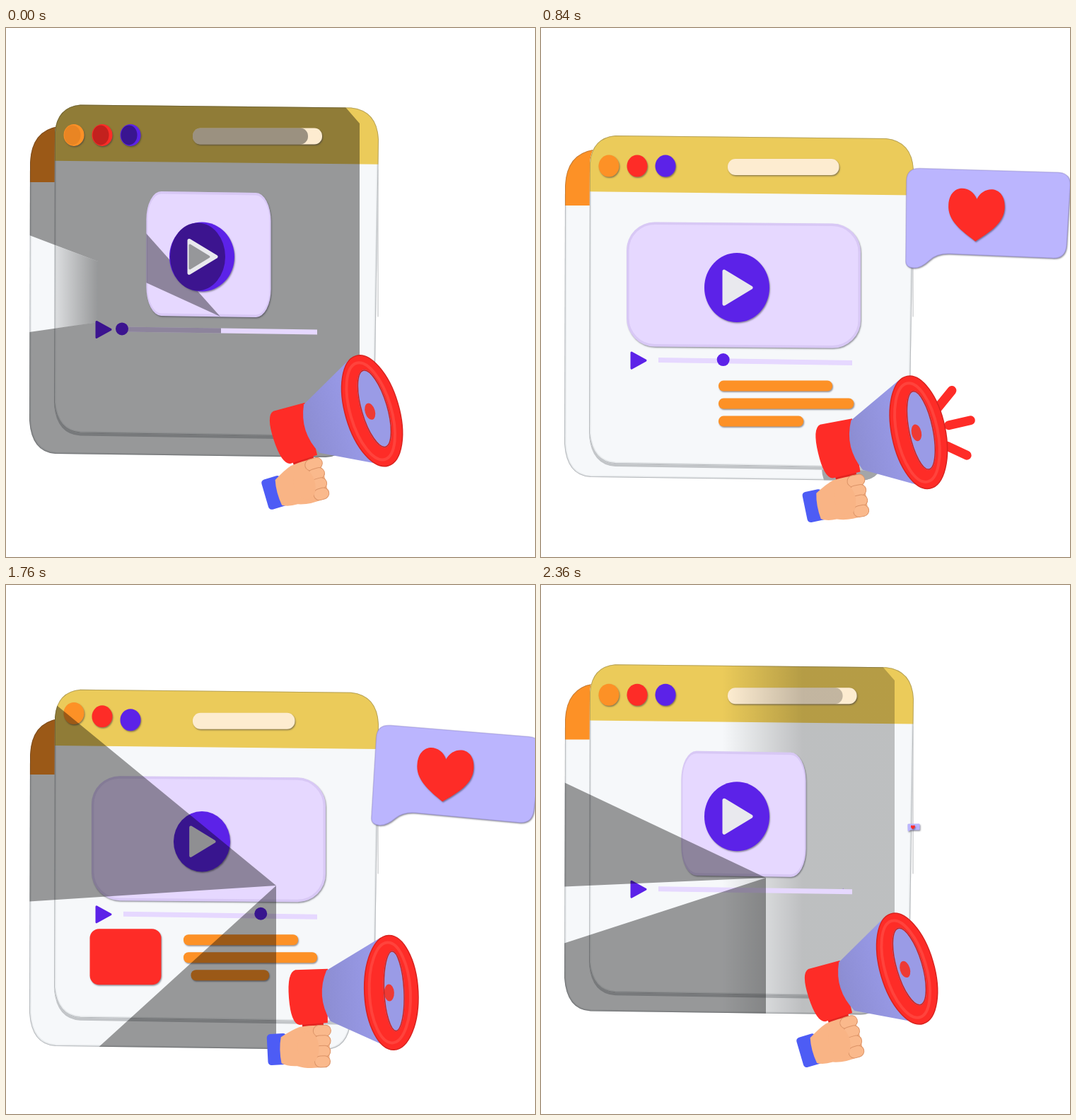
Write an HTML page with a canvas that moves like this. It is 748 px wide and 748 px high and loops after 2.4 s.

```html
<!DOCTYPE html>
<html lang="en">
<head>
<meta charset="utf-8">
<title>Video campaign</title>
<style>
html, body { margin: 0; width: 100%; height: 100%; overflow: hidden; background: #fff; }
canvas { display: block; width: 100vw; height: 100vh; }
</style>
</head>
<body>
<canvas id="stage" width="748" height="748"></canvas>
<script>
const ctx = document.getElementById('stage').getContext('2d');
const LOOP = 2400, STEP = 40, TAU = Math.PI * 2;
const RED = '#fe2c27', ORANGE = '#fd9126', PURPLE = '#5c22e8', DEEP = '#3c148f';
const LILAC = '#e6d8ff', WHITE = '#f6f8fa', SKIN = '#f9b485';
const SHADE = 'rgba(0,0,0,.39)', HAZE = 'rgba(0,0,0,.23)';

const front = new Path2D('M69 148Q72 112 105 109L488 113Q525 117 527 158L521 540Q518 580 480 579L105 573Q72 571 68 530Z');
const back = new Path2D('M34 190Q36 145 74 139L455 142Q488 145 490 185L488 565Q484 606 452 607L70 602Q36 600 33 555Z');
const bubble = new Path2D('M-7-134Q-7-152 12-152L208-153Q226-153 226-135L224-50Q223-30 203-31L58-32Q40-32 30-22Q18-10 8-10Q-4-10-4-20Z');
const heart = new Path2D('M0-22C8-42 39-44 40-13C41 10 20 24 0 38C-20 24-41 10-40-13C-39-44-8-42 0-22Z');

const clamp = x => Math.max(0, Math.min(1, x));
const rad = deg => deg * Math.PI / 180;
const wave = (t, shift = 0, period = 1200) => Math.cos(TAU * (t - shift) / period);
// Smoothstep from 0 at time a to 1 at time b
const ramp = (t, a, b) => {
  const x = clamp((t - a) / (b - a));
  return x * x * (3 - 2 * x);
};
// Elastic arrival from 0 to 1
const spring = age => age < 0 ? 0 : 1 - Math.exp(-age / 94) * wave(age, 0, 240);
// One swing to +1 and back through -1, resting before and after
const swing = age => {
  const u = clamp(age / 500);
  return Math.sin(TAU * u) * Math.sin(Math.PI * u);
};
const swings = (t, delay) => swing(t - 140 - delay) + swing(t - 1600 - delay);

function group(x, y, draw, angle = 0, sx = 1, sy = sx) {
  ctx.save();
  ctx.translate(x, y);
  ctx.rotate(rad(angle));
  ctx.scale(sx, sy);
  draw();
  ctx.restore();
}
function fill(path, color) { ctx.fillStyle = color; ctx.fill(path); }
function outline(path, color, width) {
  ctx.strokeStyle = color;
  ctx.lineWidth = width;
  ctx.stroke(path);
}
function raised(path, color) {
  ctx.save();
  ctx.shadowColor = 'rgba(50,50,65,.5)';
  ctx.shadowBlur = 2;
  ctx.shadowOffsetX = 1;
  ctx.shadowOffsetY = 1.5;
  fill(path, color);
  ctx.restore();
}
function oval(x, y, rx, ry) {
  const p = new Path2D();
  p.ellipse(x, y, rx, ry, 0, 0, TAU);
  return p;
}
function box(x, y, w, h, r) {
  const p = new Path2D();
  p.roundRect(x, y, w, h, r);
  return p;
}
function poly(...pts) {
  const p = new Path2D();
  for (let i = 0; i < pts.length; i += 2) p.lineTo(pts[i], pts[i + 1]);
  p.closePath();
  return p;
}
// Wedge of shadow that spreads from one point between two angles
function fan(x, y, from, to) {
  const far = a => [x + 900 * Math.cos(rad(a)), y + 900 * Math.sin(rad(a))];
  return poly(x, y, ...far(from), ...far(to));
}
function line(x1, y1, x2, y2, width, color) {
  ctx.lineCap = 'round';
  outline(new Path2D(`M${x1} ${y1}L${x2} ${y2}`), color, width);
}
function triangle(x, y, w, h, color, round = 5) {
  const p = poly(x, y - h / 2, x + w, y, x, y + h / 2);
  ctx.lineJoin = 'round';
  outline(p, color, round);
  fill(p, color);
}
function fade(x1, x2, from, to) {
  const g = ctx.createLinearGradient(x1, 0, x2, 0);
  g.addColorStop(0, from);
  g.addColorStop(1, to);
  return g;
}

function pane(path, header, headY, slope) {
  ctx.save();
  fill(path, WHITE);
  ctx.clip(path);
  outline(path, '#e6e9eb', 5);
  fill(poly(0, 0, 748, 0, 748, headY + slope * 748, 0, headY), header);
  outline(path, 'rgba(70,75,80,.3)', 2);
  ctx.restore();
}

const sceneAt = t => t < 240 ? 'dark' : t < 1680 ? 'lit' : t < 1960 ? 'cross' : t < 2260 ? 'low' : 'dusk';

// Shade on the bare panes, below their contents
function paneShade(scene) {
  const reach = poly(0, 0, 470, 0, 480, 112, 500, 135, 500, 748, 0, 748);
  if (scene === 'dark') {
    reach.addPath(poly(33, 293, 130, 330, 130, 416, 33, 430));
    ctx.fillStyle = SHADE;
    ctx.fill(reach, 'evenodd');
    fill(poly(69, 307, 130, 330, 130, 416, 69, 425), fade(69, 130, 'rgba(0,0,0,.1)', SHADE));
  } else if (scene === 'dusk') {
    fill(reach, fade(256, 370, 'rgba(0,0,0,0)', HAZE));
  }
}
// Shade across panes and contents
function fans(scene) {
  if (scene === 'cross') return [fan(382, 425, 219.4, 176.3), fan(382, 425, 137.7, 90)];
  if (scene === 'low') return [fan(378, 424, 176.2, 134.7)];
  if (scene === 'dusk') return [fan(318, 414, 205.3, 177.5), fan(318, 414, 162, 90)];
  return [];
}

function contents(t, scene) {
  const dim = scene === 'dark', ink = dim ? DEEP : PURPLE;
  [ORANGE, RED, PURPLE].forEach((color, i) => {
    const x = 96 + 40 * i, y = 152 - 12 * swings(t, 80 * i);
    raised(oval(x, y, 14.5, 15.5), color);
    if (dim) fill(oval(x - 2, y, 11.5, 14), `rgba(0,0,0,${.08 + .15 * i})`);
  });

  const end = 427.5 + 19.5 * wave(t);
  raised(box(264, 142, end - 264, 23, 11), '#fdecd0');
  if (dim || scene === 'dusk') fill(box(264, 142, end - 284, 23, 11), dim ? SHADE : fade(264, 370, 'rgba(0,0,0,0)', HAZE));

  ctx.save();
  ctx.translate(286.5, 320.5);
  ctx.transform(.532 + .468 * (ramp(t, 80, 400) - ramp(t, 2000, 2250)), .008, 0, 1, 0, 0);
  const panel = box(-165.5, -88, 331, 176, 40);
  raised(panel, LILAC);
  ctx.clip(panel);
  outline(panel, 'rgba(190,170,225,.35)', 7);
  ctx.resetTransform();
  if (dim) fill(fan(303, 408, 228.3, 204.6), SHADE);
  ctx.restore();

  group(277, 324, () => {
    raised(oval(0, 0, 46, 49), PURPLE);
    if (dim) fill(oval(-6, 0, 39, 48), DEEP);
    triangle(-18, 0, 38, 46, '#e9e9ee');
    if (dim) triangle(-17, 0, 27, 33, '#96979a', 3);
  }, 0, 1 - .19 * swings(t, 40));

  triangle(128, 427, 20, 22, ink, 3);
  fill(poly(166, 423, 440, 427, 440, 434, 166, 430), LILAC);
  if (dim) fill(poly(166, 423, 304, 425, 304, 432, 166, 430), SHADE);
  const knob = 9 * (1 - ramp(t, 2190, 2385));
  fill(oval(164 + .1115 * t, 426, knob, knob), ink);

  // Text rows spring out from the left and leave towards the right
  [162, 189, 121].forEach((width, i) => {
    const exit = 1930 - 120 * i;
    const x = 251 + width * ramp(t, exit, exit + 385);
    const w = 251 + width * spring(t - 360 - 93 * i) - x;
    if (w > 1) raised(box(x, 455.5 + 25 * i, w, 15, Math.min(7, w / 3)), ORANGE);
  });

  const size = spring(t - 910) * (1 - ramp(t, 2160, 2340));
  const stretch = 1 - .18 * swing(t - 1750);
  if (size > 0) group(169, 487, () => raised(box(-50.5, -39.5, 101, 79, 13), RED), 0, size * stretch, size);
}

function speech(t) {
  const size = spring(t - 360) * (1 - ramp(t, 2160, 2400));
  if (size <= 0) return;
  const sway = 1.4 + 4 * wave(t, 220, 800), settled = ramp(t, 600, 800);
  group(519, 349, () => {
    raised(bubble, '#bbb5fe');
    outline(bubble, 'rgba(130,120,190,.35)', 1.5);
    group(94, -89, () => raised(heart, RED));
  }, 9 + (sway - 9) * settled, size);
}

// Three strokes shoot out, then shrink towards their far ends
function sparks(t, x, y) {
  const age = t - 168, p = age % 480 / 480;
  if (age < 0 || age > 1440) return;
  const head = ramp(p, 0, .5), tail = ramp(p, .6, 1);
  if (head - tail < .02) return;
  for (let i = 0; i < 3; i++) {
    const a = rad(-51 + 38 * i), near = 45 + 35 * tail, far = 45 + 35 * head;
    line(x + near * Math.cos(a), y + near * Math.sin(a),
      x + far * Math.cos(a), y + far * Math.sin(a), 13 - 4 * tail, RED);
  }
}

function megaphone(lean) {
  fill(box(-4, -40, 30, 18, 4), '#e32420');
  fill(new Path2D('M-10-111Q-22-108-21-72Q-20-36-8-33L32-34L36-110Z'), RED);
  fill(new Path2D('M34-108L112-150L118 6L36-36Q17-72 34-108Z'), fade(20, 110, '#8b8cd0', '#9a9bea'));

  const ring = oval(124, -72, 38, 81);
  fill(ring, RED);
  outline(ring, '#d8221e', 1.5);
  outline(oval(122, -72, 29, 71), 'rgba(255,120,110,.3)', 4);
  const inside = oval(128, -74, 14 + lean * .3, 57);
  ctx.save();
  fill(inside, '#9a9be6');
  ctx.clip(inside);
  fill(oval(121, -72, 7, 12), '#ee3a34');
  outline(inside, '#c62622', 3);
  ctx.restore();
}

function hand() {
  fill(box(-55, -22, 28, 44, 5), '#4d5cf5');
  fill(new Path2D('M-35-17Q-18-27-8-30Q12-32 26-30L34-12L32 18L24 28Q2 31-14 25Q-28 25-36 20Q-39 0-35-17Z'), SKIN);
  for (let i = 0; i < 4; i++) {
    const finger = box(11, -31 + 14.5 * i, 25 - i, 16, 8);
    fill(finger, '#fab98c');
    outline(finger, '#dc9468', 1);
  }
  fill(oval(3, 0, 15, 23), SKIN);
}

function render(t) {
  const scene = sceneAt(t);
  const backY = 25.25 * (1 - wave(t)), frontY = 21 - 27 * wave(t, 123);
  const x = 419 + 8 * ramp(t, 0, 600) - 18 * ramp(t, 1080, 1480) + 21 * ramp(t, 1480, 1900) - 11 * ramp(t, 2160, 2360);
  const y = 652.6 - 14 * wave(t, 123) + 8 * wave(t, 400, LOOP);
  const lean = 16.4 - 5.4 * ramp(t, 0, 1080) - 11 * ramp(t, 1480, 1900) + 16.4 * ramp(t, 2160, 2360);

  ctx.fillStyle = '#fff';
  ctx.fillRect(0, 0, 748, 748);

  group(0, backY, () => {
    pane(back, ORANGE, 218, 0);
    if (scene !== 'lit') return;
    ctx.clip(back);
    fill(oval(x + 20, y - 45 - backY, 50, 50), '#a3a5a8');
  });
  line(526, 200 + backY * .6, 526, 408, 1, '#b9bbbe');
  group(0, frontY + 4, () => fill(front, '#c2c5c8'));
  group(0, frontY, () => pane(front, '#ebcb5a', 187.5, .011));

  const panes = new Path2D();
  panes.addPath(back, new DOMMatrix([1, 0, 0, 1, 0, backY]));
  panes.addPath(front, new DOMMatrix([1, 0, 0, 1, 0, frontY]));
  const onPanes = draw => {
    ctx.save();
    ctx.clip(panes);
    draw();
    ctx.restore();
  };
  onPanes(() => paneShade(scene));
  group(0, frontY, () => contents(t, scene));
  onPanes(() => fans(scene).forEach(f => fill(f, SHADE)));

  speech(t);
  const a = rad(-lean), c = Math.cos(a), s = Math.sin(a);
  sparks(t, x + 123 * c + 72 * s, y + 123 * s - 72 * c);
  group(x, y, () => { megaphone(lean); hand(); }, -lean);
}

const begin = performance.now();
function tick() {
  const t = (performance.now() - begin) % LOOP;
  render(Math.floor(t / STEP) * STEP);
  requestAnimationFrame(tick);
}
tick();
</script>
</body>
</html>
```
